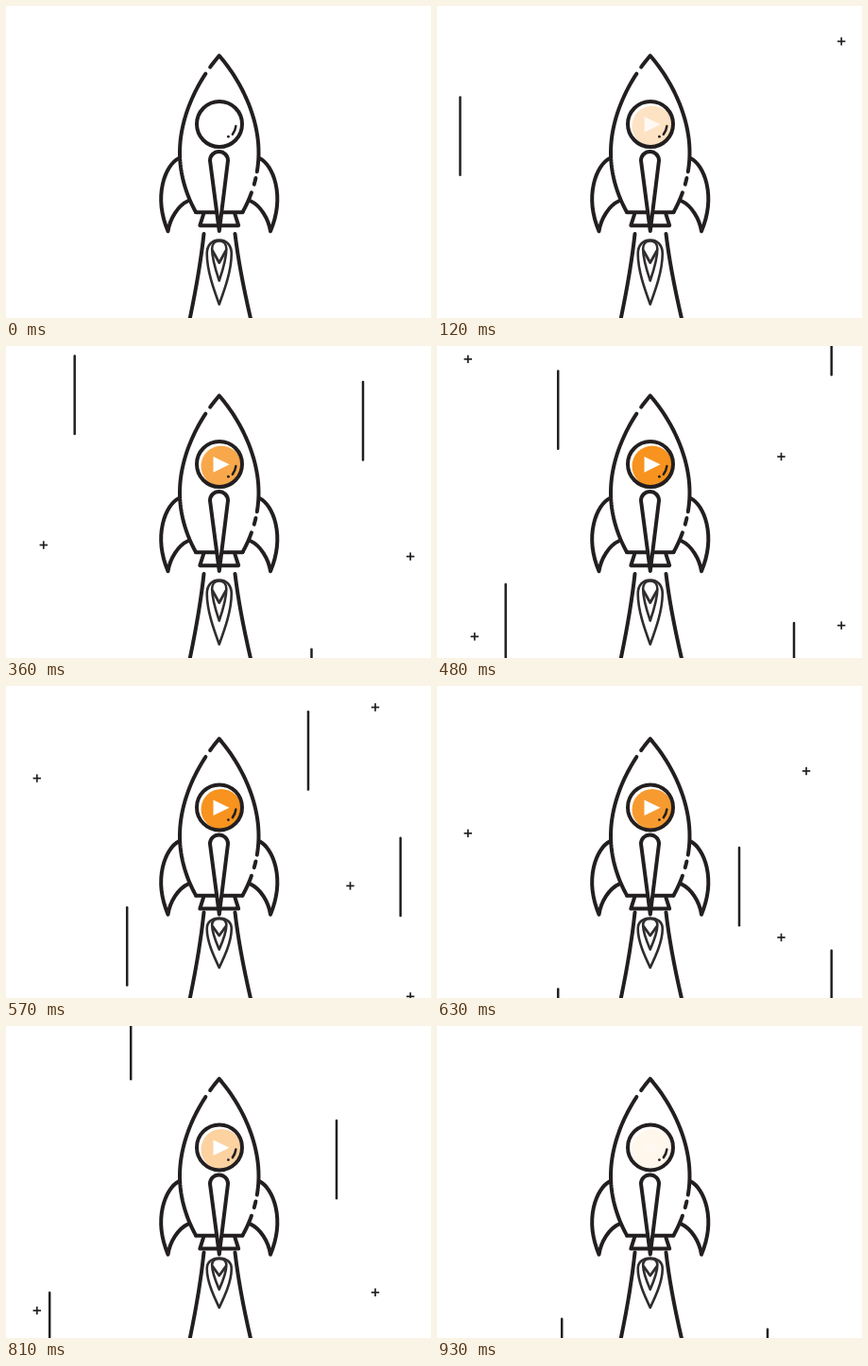
Recreate the animation shown at these times as an HTML page with a canvas. Size 450 by 330 pixels, loop 0.96 s.

```html
<!DOCTYPE html>
<html lang="en">
<head>
<meta charset="utf-8">
<title>Rocket</title>
<style>
html, body { margin: 0; width: 100%; height: 100%; overflow: hidden; background: #fff; }
canvas { display: block; }
</style>
</head>
<body>
<canvas id="stage" width="450" height="330"></canvas>
<script>
const ctx = document.getElementById('stage').getContext('2d');
const STEP = 30, STEPS = 32, DROP_STEP = 17;
const INK = '#231f20', FLAME = '#302d2e', ORANGE = '#f7931e', CX = 225.75;

const clamp = v => Math.max(0, Math.min(1, v));
const smooth = u => u * u * (3 - 2 * u);
const fall = (u, from, to) => from + (to - from) * smooth(clamp(u));

function stroke(width, build, color = INK) {
  ctx.beginPath();
  build();
  ctx.lineWidth = width;
  ctx.strokeStyle = color;
  ctx.stroke();
}

function fill(color, build) {
  ctx.beginPath();
  build();
  ctx.fillStyle = color;
  ctx.fill();
}

function poly(...points) {
  points.forEach(([x, y], i) => i ? ctx.lineTo(x, y) : ctx.moveTo(x, y));
}

function circle(x, y, r) {
  ctx.arc(x, y, r, 0, 2 * Math.PI);
}

function mirrored(draw) {
  draw();
  ctx.save();
  ctx.translate(2 * CX, 0);
  ctx.scale(-1, 1);
  draw();
  ctx.restore();
}

// Part of a cubic curve between parameters a and b
function curvePart(p, a, b) {
  for (let i = 0; i <= 24; i++) {
    const t = a + (b - a) * i / 24, s = 1 - t;
    const at = k => s * s * s * p[0][k] + 3 * s * s * t * p[1][k] +
      3 * s * t * t * p[2][k] + t * t * t * p[3][k];
    if (i) ctx.lineTo(at(0), at(1)); else ctx.moveTo(at(0), at(1));
  }
}

function drawSky(step) {
  const streak = (x, start, span = 10.6) => {
    const y = fall((step - start) / span, -184, 332);
    stroke(2.5, () => poly([x, y + 0.5], [x, y + 82.8]));
  };
  const star = (x, start, span = 20.2) => {
    const y = fall((step - start) / span, -100, 336);
    stroke(1.7, () => poly([x - 4.2, y], [x + 4.2, y]));
    stroke(1.7, () => poly([x, y - 4.2], [x, y + 4.2]));
  };

  ctx.lineCap = 'round';
  streak(24.5, -1.6);
  streak(323.5, 2.35);
  streak(72.7, 7, 12);
  streak(378, 7.2);
  streak(128.2, 11.36);
  streak(417.7, 12.5);
  streak(320, 14.35);
  streak(46.2, 18.45);
  streak(350, 21.35);
  streak(132.2, 24.1, 7.9);

  ctx.lineCap = 'butt';
  star(428.2, -6.25, 27.4);
  star(39.8, -1.04);
  star(364.5, 5.93);
  star(32.8, 8.5, 22.4);
  star(391, 12.5, 18.6);
  ctx.lineCap = 'round';
}

function drawHull() {
  const upper = [[CX, 52.5], [202, 80], [184, 118], [184, 155]];
  const lower = [[184, 155], [184, 180], [192, 202], [201, 218]];
  const flip = curve => curve.map(([x, y]) => [2 * CX - x, y]);
  stroke(4, () => {
    curvePart(upper, 0, 0.14);
    curvePart(upper, 0.215, 1);
    curvePart(lower, 0, 1);
    curvePart(flip(upper), 0, 1);
    curvePart(flip(lower), 0, 0.28);
    curvePart(flip(lower), 0.38, 0.48);
    curvePart(flip(lower), 0.62, 1);
  });
  mirrored(() => stroke(4, () => {
    poly([CX, 218.3], [201, 218.3]);
    poly([209.5, 219], [205.3, 232.2], [CX, 232.2]);
    ctx.moveTo(183, 161);
    ctx.bezierCurveTo(169, 168, 155.5, 200, 171.5, 238.3);
    ctx.bezierCurveTo(173.5, 225, 182, 211, 193, 206);
  }));
}

function drawKeel() {
  const keel = () => {
    ctx.moveTo(225.8, 238);
    ctx.lineTo(216, 163.5);
    ctx.arc(225.5, 163.5, 9.5, Math.PI, 0);
    ctx.closePath();
  };
  fill('#fff', keel);
  stroke(4, keel);
}

function drawWindow(glow) {
  ctx.globalAlpha = glow;
  fill(ORANGE, () => circle(228, 127, 21.5));
  ctx.globalAlpha = clamp(glow * 3);
  fill('#fff', () => poly([219.5, 117], [236.5, 125.3], [219.5, 133.7]));
  ctx.globalAlpha = 1;
  stroke(4, () => circle(226, 125, 24));
  stroke(2.5, () => ctx.arc(226, 125, 17.5, 0.12, 0.66));
  fill(INK, () => circle(235.4, 138.2, 1.4));
}

function drop(top, wide, half, tip) {
  mirrored(() => {
    const x = CX - half;
    ctx.moveTo(CX, tip);
    ctx.bezierCurveTo(CX - half * 0.45, tip - (tip - wide) * 0.3,
      x, wide + (tip - wide) * 0.33, x, wide);
    ctx.bezierCurveTo(x, wide - (wide - top) * 0.6, CX - half * 0.6, top, CX, top);
  });
}

function drawFlame(dropped) {
  const y = v => dropped ? 245.5 + (v - 247.5) * 0.77 : v;
  stroke(2.6, () => drop(y(247.5), y(262), 13, y(315.5)), FLAME);
  stroke(2.6, () => drop(y(248.5), y(257), 7.6, y(290.5)), FLAME);
  stroke(2.8, () => poly([218.8, y(259)], [CX, y(271.5)], [232.7, y(259)]), FLAME);
}

function drawTrails(dropped) {
  const trail = (top, end) => stroke(4, () => {
    ctx.moveTo(top, dropped ? 239.5 : 241);
    ctx.quadraticCurveTo(top + (end - top) * 0.27, 280, end, 334);
  });
  trail(209.5, 194);
  trail(242.5, 259.8);
}

function draw(step) {
  const dropped = step >= DROP_STEP;
  const time = step * STEP;
  const glow = Math.min(clamp(time / 450), clamp((960 - time) / 360));
  fill('#fff', () => ctx.rect(0, 0, 450, 330));
  ctx.lineJoin = 'round';
  drawSky(step);
  drawTrails(dropped);
  drawFlame(dropped);
  ctx.save();
  ctx.translate(0, dropped ? 3.4 : 0);
  drawHull();
  drawWindow(glow);
  drawKeel();
  ctx.restore();
}

const startTime = performance.now();
function tick() {
  draw(Math.floor((performance.now() - startTime) / STEP) % STEPS);
  requestAnimationFrame(tick);
}
tick();
</script>
</body>
</html>
```
